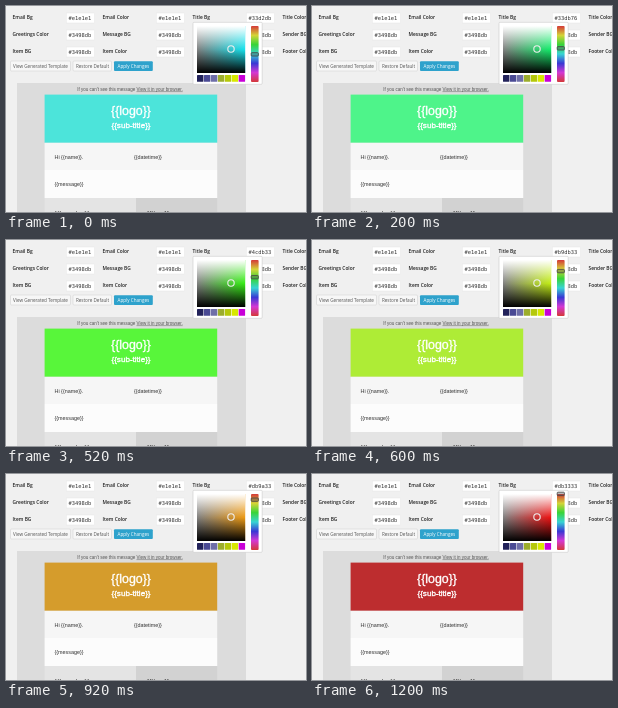
Animation, 300 px wide and 206 px high, one loop 1.4 s. Source, as an HTML page:

```html
<!DOCTYPE html>
<html lang="en">
<head>
<meta charset="utf-8">
<title>Email template colors</title>
<style>
  html, body { margin: 0; width: 100%; height: 100%; overflow: hidden; background: #f0f0f0; }
  svg { display: block; width: 100vw; height: 100vh; animation: pick 1.4s step-end infinite; }
  text { fill: #333; }
  .label { font: 600 4.85px "Open Sans", sans-serif; fill: #222; }
  .value { font: 5.4px "DejaVu Sans Mono", monospace; }
  .input { fill: #fff; stroke: #e2e2e2; stroke-width: .4; }
  .btn rect { fill: #f7f7f7; stroke: #ccc; stroke-width: .5; }
  .btn text { font: 4.6px "Open Sans", sans-serif; fill: #555; text-anchor: middle; }
  .btn.main rect { fill: #2ea2cc; stroke: none; }
  .btn.main text { fill: #fff; }
  .mail text { font-family: "Liberation Sans", Arial, sans-serif; font-size: 5.4px; }
  .mail .note { font-size: 4.5px; fill: #555; text-anchor: middle; }
  .note tspan { text-decoration: underline; }
  .mail .logo, .mail .sub { fill: #fff; stroke: #fff; stroke-width: .35; text-anchor: middle; }
  .mail .logo { font-size: 12.4px; }
  .mail .sub { font-size: 8.1px; }
  .mail .head { font-size: 8.1px; fill: #555; }
  .mail .item { font-size: 6.4px; font-weight: bold; fill: #555; }
  .tone { fill: var(--tone); }
  .pure { stop-color: hsl(var(--hue), 85%, 50%); }
  .grip { transform: translateY(calc(var(--hue) / 360 * 56px)); }
  .turn {
    visibility: hidden;
    animation: show 1.4s step-end infinite;
    animation-delay: calc(var(--i) * .2s - 1.4s);
  }
  @keyframes show {
    0% { visibility: visible; }
    14.2857%, 100% { visibility: hidden; }
  }
  @keyframes pick {
    0%       { --hue: 183; --tone: #4ce4da; }
    14.2857% { --hue: 144; --tone: #4ef48a; }
    28.5714% { --hue: 111; --tone: #58f63a; }
    42.8571% { --hue: 72;  --tone: #aeec36; }
    57.1428% { --hue: 37;  --tone: #d59c2c; }
    71.4285% { --hue: 9;   --tone: #c94a2c; }
    85.7142%, 100% { --hue: 0; --tone: #bd2d2f; }
  }
</style>
</head>
<body>
<svg viewBox="0 0 300 206" preserveAspectRatio="none">
  <defs>
    <linearGradient id="sat">
      <stop stop-color="#808080"/>
      <stop class="pure" offset="1"/>
    </linearGradient>
    <linearGradient id="light" x2="0" y2="1">
      <stop stop-color="#fff"/>
      <stop offset=".5" stop-color="#fff" stop-opacity="0"/>
      <stop offset=".5" stop-color="#000" stop-opacity="0"/>
      <stop offset="1" stop-color="#000"/>
    </linearGradient>
    <linearGradient id="hues" x2="0" y2="1">
      <stop stop-color="#d43838"/>
      <stop offset=".1667" stop-color="#d4d438"/>
      <stop offset=".3333" stop-color="#38d438"/>
      <stop offset=".5" stop-color="#38d4d4"/>
      <stop offset=".6667" stop-color="#3838d4"/>
      <stop offset=".8333" stop-color="#d438d4"/>
      <stop offset="1" stop-color="#d43838"/>
    </linearGradient>
  </defs>

  <rect width="300" height="206" fill="#f0f0f0"/>
  <g id="fields"></g>

  <g class="btn">
    <rect x="4.5" y="55" width="60" height="10" rx="1"/>
    <text x="34.5" y="62">View Generated Template</text>
  </g>
  <g class="btn">
    <rect x="67" y="55" width="38.5" height="10" rx="1"/>
    <text x="86.5" y="62">Restore Default</text>
  </g>
  <g class="btn main">
    <rect x="108" y="55.2" width="38.8" height="9.8" rx="1"/>
    <text x="127.4" y="62">Apply Changes</text>
  </g>

  <g class="mail">
    <rect x="11" y="77" width="229" height="129" fill="#dcdcdc"/>
    <text class="note" x="124" y="84.6">If you can't see this message <tspan>View it in your browser.</tspan></text>
    <rect class="tone" x="38.6" y="88.6" width="172.6" height="48.2"/>
    <text class="logo" x="125" y="109">{{logo}}</text>
    <text class="sub" x="125" y="121.8">{{sub-title}}</text>
    <rect x="38.6" y="136.8" width="172.6" height="27.2" fill="#f6f6f6"/>
    <text x="48.5" y="153">Hi {{name}}.</text>
    <text x="128" y="153">{{datetime}}</text>
    <rect x="38.6" y="164" width="172.6" height="28" fill="#fcfcfc"/>
    <text x="48.5" y="180">{{message}}</text>
    <rect x="38.6" y="192" width="91.4" height="14" fill="#e4e4e4"/>
    <rect x="130" y="192" width="81.2" height="14" fill="#d2d2d2"/>
    <text class="head" x="48" y="210">{{header}}</text>
    <text class="item" x="140.5" y="210">{{item}}</text>
  </g>

  <g id="picker">
    <rect x="187" y="16.3" width="69.2" height="62" rx="1" fill="#fff" stroke="#ccc" stroke-width=".6"/>
    <rect x="191" y="20" width="48.2" height="47" fill="url(#sat)"/>
    <rect x="191" y="20" width="48.2" height="47" fill="url(#light)"/>
    <circle cx="225" cy="43" r="3.2" fill="none" stroke="#eee" stroke-width="1.1"/>
    <rect x="245" y="20" width="7.6" height="56" rx="1" fill="url(#hues)"/>
    <rect class="grip" x="245.2" y="18.2" width="7.2" height="3.4" rx=".8" fill="#555" fill-opacity=".4" stroke="#444" stroke-width=".8"/>
  </g>
</svg>
<script>
  const make = (id, tag, attrs, text = "") => {
    const el = document.createElementNS("http://www.w3.org/2000/svg", tag);
    for (const key in attrs) el.setAttribute(key, attrs[key]);
    el.textContent = text;
    document.getElementById(id).append(el);
  };

  const rows = [
    ["Email Bg", "Email Color", "Title Bg", "Title Color"],
    ["Greetings Color", "Message BG", "", "Sender BG"],
    ["Item BG", "Item Color", "", "Footer Color"]
  ];
  const titles = ["#33d2db", "#33db76", "#4cdb33", "#b9db33", "#db9a33", "#db4c33", "#db3333"];

  rows.forEach((row, r) => row.forEach((name, c) => {
    const x = 6.6 + c * 90, y = 12.6 + r * 17;
    make("fields", "text", { class: "label", x, y }, name);
    if (c > 2) return;
    make("fields", "rect", { class: "input", x: x + 53.6, y: y - 5.6, width: 28.4, height: 10 });
    const at = { class: "value", x: x + 56, y: y + 1.2 };
    if (r || c < 2) make("fields", "text", at, r ? "#3498db" : "#e1e1e1");
    else titles.forEach((hex, i) =>
      make("fields", "text", { ...at, class: "value turn", style: `--i:${i}` }, hex));
  }));

  ["#22225a", "#4a4a94", "#6e6ea8", "#9cad2c", "#b5c80a", "#d8e800", "#c800d8"].forEach((fill, i) =>
    make("picker", "rect", { x: 191 + i * 6.95, y: 69, width: 6.4, height: 6.8, rx: .6, fill }));
</script>
</body>
</html>
```
